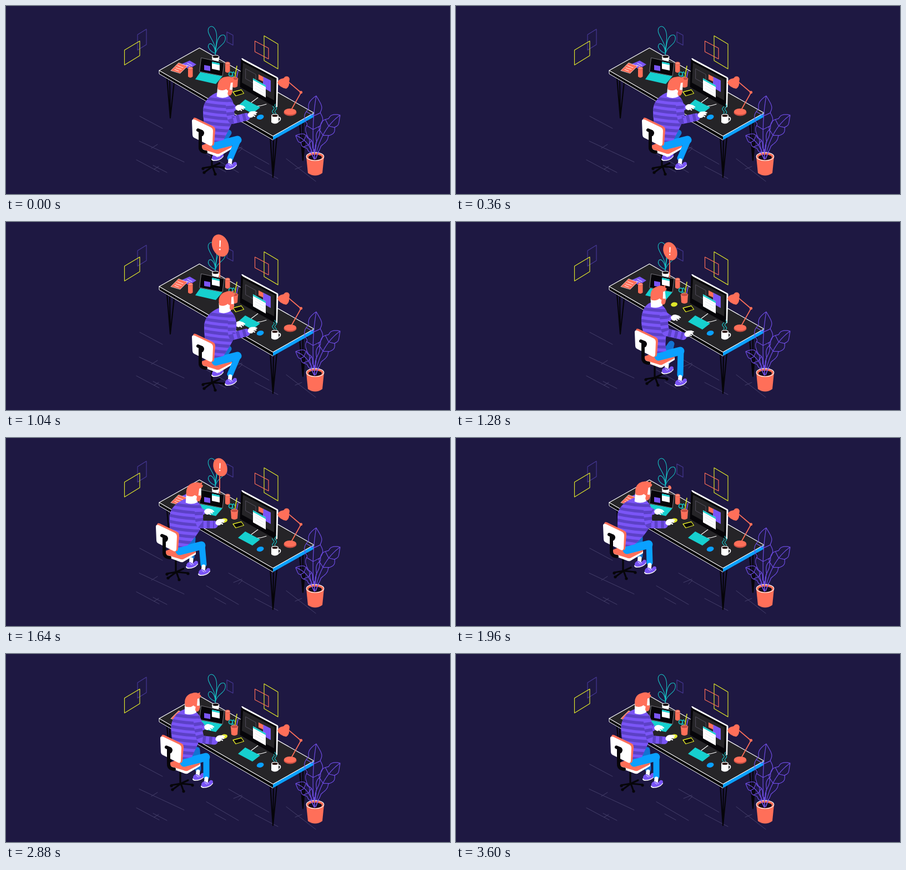
Write an HTML page that moves like this. It is 800 px wide and 341 px high and loops after 3.64 s.

```html
<!DOCTYPE html>
<html lang="en">
<head>
<meta charset="utf-8">
<title>Two screens, one desk</title>
<style>
  html, body { margin: 0; width: 100%; height: 100%; overflow: hidden; background: #1e1842; }
  svg { display: block; width: 100vw; height: 100vh; }
  path, line { fill: none; stroke-linecap: round; stroke-linejoin: round; }
  .coral { fill: #ff6f59; } .white { fill: #fff; } .teal { fill: #16d0cf; }
  .yellow { fill: #dfe62a; } .blue { fill: #0aa0ff; } .purple { fill: #7a55f6; }
  .black { fill: #060509; } .desk { fill: #252427; }
  .lcoral { stroke: #ff6f59; } .lwhite { stroke: #fff; } .lteal { stroke: #16c3c6; }
  .lyellow { stroke: #dfe62a; } .lblue { stroke: #0aa0ff; } .lpurple { stroke: #7a55f6; }
  .lblack { stroke: #060509; } .lnavy { stroke: #1273d2; } .ldim { stroke: #463895; }
  .stripe { stroke: #5c41c6; stroke-width: 5.5; stroke-linecap: butt; }
</style>
</head>
<body>
<svg viewBox="0 0 800 341" preserveAspectRatio="none">
  <rect width="800" height="341" fill="#1e1842"/>

  <!-- floor -->
  <path stroke="#49436f" stroke-width=".9" d="M241 200L282 222M240 245L321 283M262 258L273 251M235 279L276 301M265 289L290 302M267 296L275 291
    M361 268L419 302M376 290L396 301M401 245L474 287M410 262L425 256M419 265L426 258M448 291L490 313M505 277L558 318M521 296L533 291"/>

  <!-- wall -->
  <g stroke-width="1.150">
    <path class="ldim" d="M237 52L253 42V70L237 80ZM398 47L409 53V71L398 65Z"/>
    <path class="lyellow" d="M213.500 80L241 63.500V90L213.500 107ZM465 54L490 69V114L465 99Z"/>
    <path class="lcoral" d="M448.500 63.500L473 76.500V96L448.500 83Z"/>
  </g>

  <!-- desk -->
  <path class="lblack" stroke-width="2.2" d="M290 130L296 203L303 138M295 132L296 203M476 236L481 311L488 238M482 240L481 311M529 212L535 280L542 205M535 210L535 280"/>
  <path class="black" d="M276 117L481 236V243L276 123Z"/>
  <path class="blue" d="M481 236L555 194V201L481 243Z"/>
  <path class="desk lwhite" stroke-width="1.150" d="M276 117L348.500 76L555 194L481 236Z"/>
  <path class="lwhite" stroke-width="1" d="M276 117V123L481 243"/>

  <!-- small plant -->
  <path class="lteal" stroke-width="1.050" d="M377 90C380 68 368 60 364.500 47C363 37 371 34 376 41C383 52 378 68 377 90
    C379 70 380 58 388 53C396 50 397 59 393 66C387 74 379 76 377 88C378 76 371 66 366 69C361 75 369 83 377 86"/>
  <path class="white" d="M371 92L372 101Q377.500 105 383 101L384.500 92Z"/>
  <ellipse cx="377.700" cy="92" rx="6" ry="2.800" fill="#1a1114" stroke="#fff"/>

  <g id="sign">
    <path class="lcoral" stroke-width="1.8" d="M385 66V102"/>
    <ellipse class="coral" cx="386" cy="53" rx="12" ry="17" transform="rotate(-20 386 53)"/>
    <text x="385.500" y="60" text-anchor="middle" fill="#fff" font-family="Inter, Arial, sans-serif" font-size="20" transform="rotate(2 386 53)">!</text>
  </g>

  <!-- left half of the desk -->
  <path class="purple" d="M317 105L331 99L343 106L329 115Z"/>
  <path class="coral" stroke="#fff" stroke-width=".6" d="M297 117L311 103L327 109L314 122Z"/>
  <path class="lwhite" stroke-width=".9" d="M309 108L319 112M306 112L316 115M304 115L311 118M327 104L335 108M325 107L332 110"/>
  <g id="can"><path class="coral" d="M328 113V128Q332 132 336.500 128V113Z"/><ellipse cx="332.200" cy="113" rx="4.300" ry="2.500" fill="#ff8a75" stroke="#c94e42" stroke-width=".7"/></g>
  <use href="#can" x="67" y="-9"/>
  <path class="black" stroke="#77757d" stroke-width="1" d="M352 94L393 103L390 127L349 119Z"/>
  <path class="purple" d="M357 107L368 109V118L357 116Z"/>
  <path class="white" d="M371 101L385 104V117L371 114Z"/>
  <path class="teal" d="M371 101L385 104V107L371 104Z"/>
  <path class="teal" d="M350 120L390 127.500L378 141.500L341 133Z"/>

  <!-- cup, mouse, phone -->
  <path class="lteal" stroke-width="1.5" d="M410 132L406 127C399 128 401 118 406 120C410 121 408 126 406 127M411 130C405 122 411 115 412 123"/>
  <path class="lyellow" stroke-width="1.600" d="M412 132L416 109"/>
  <path class="lpurple" stroke-width="1.600" d="M415 132L418 118"/>
  <path class="coral" d="M405 132L406 146Q411.500 150 417 146L418 132Z"/>
  <ellipse cx="411.500" cy="132" rx="6.500" ry="3" fill="#c94e42" stroke="#ff8a75" stroke-width=".8"/>
  <ellipse class="yellow" cx="393" cy="149.500" rx="6" ry="4" transform="rotate(-10 393 149)"/>
  <path class="black lyellow" stroke-width="1.300" d="M409 156L424 152L428.500 158.500L414 163Z"/>

  <!-- monitor -->
  <path class="lwhite" stroke-width="1.150" d="M454 166L442 175Q439 179 446 181Q455 183 469 178"/>
  <path class="white" d="M424 95Q426 94 428 96L489 129Q491 130 490.500 133L489 183L486 184Z"/>
  <path class="black" d="M423.500 97L487.500 131L486.500 184L421.500 147Z"/>
  <path class="desk" d="M427 103L484 133L483 171L425 139Z"/>
  <path stroke="#655f72" stroke-width=".7" d="M432 114L450 124V142L432 132Z"/>
  <path class="purple" d="M463 128L477 135V156L463 148Z"/>
  <path class="coral" d="M455 124L463.500 128.500V137L455 133Z"/>
  <path class="white" d="M445 131L468 144V166L445 153Z"/>
  <path class="teal" d="M445 131L468 144V147L445 134Z"/>
  <path stroke="#d5dbe2" stroke-width=".6" d="M449 139L464 148M449 144L464 153M449 149L464 158"/>

  <!-- keyboard, mouse, mug -->
  <path class="teal" d="M418 181L431 169.500L458 184L444 195Z"/>
  <ellipse class="blue" cx="458" cy="201.500" rx="6.500" ry="4.300" transform="rotate(-15 458 201)"/>
  <path class="lwhite" stroke-width="1.700" d="M490 202C496 200 496 209 490 209"/>
  <path class="white" d="M478 199V211Q484.500 216 491 211V199Z"/>
  <ellipse cx="484.500" cy="199" rx="5.800" ry="2.700" fill="#2a1512" stroke="#fff" stroke-width="1.300"/>
  <path id="steam" class="lteal" stroke-width="1.150"/>

  <!-- lamp -->
  <ellipse cx="512" cy="193" rx="11.500" ry="6.500" fill="#c94e42"/>
  <ellipse class="coral" cx="512" cy="191.500" rx="11" ry="5.500"/>
  <path class="lcoral" stroke-width="1.700" d="M513 190L531.500 157L508 137"/>
  <circle class="coral" cx="531.500" cy="156.500" r="2.600"/>
  <path class="coral" d="M489 139Q491 132 500 131L503 128Q509 126 511 132L510 139Q511 146 505 150Q493 148 489 139Z"/>

  <!-- worker -->
  <clipPath id="clip"><path id="clipShape"/></clipPath>
  <g id="base">
    <path class="lblack" stroke-width="3.200" d="M36 62V88M37 88L20 91M37 88L58 90M37 88L42 102M37 88L22 99M37 88L50 82"/>
    <g class="black"><circle cx="20" cy="92" r="2.600"/><circle cx="58" cy="91" r="2.600"/><circle cx="42" cy="102" r="2.600"/><circle cx="22" cy="99" r="2.600"/></g>
  </g>
  <path id="farShin" class="lnavy" stroke-width="11"/>
  <g id="farFoot"><use href="#shoe"/></g>
  <g id="seat">
    <path class="white" d="M13 53L47 64L72 51V56L49 70Q46 71 42 69L13 58Z"/>
    <path class="coral" d="M12 52L40 41L70 48Q74 51 70 54L49 65Q46 66 42 64L13 55Z"/>
  </g>
  <path id="thigh" class="lblue" stroke-width="15"/>
  <path id="shin" class="lblue" stroke-width="11"/>
  <g id="foot"><g id="shoe">
    <path class="lwhite" stroke-width="7" stroke-linecap="butt" d="M-1 -10L-1.500 -5"/>
    <path class="white" d="M-11 3Q-11 7 -6 7Q5 7 11 -1L10 -4Z"/>
    <path class="purple" d="M-10 0Q-8 -5 -4 -5L2 -3L6 -7Q11 -8 11 -3Q6 5 -5 5.500Q-11 5 -10 0Z"/>
    <path class="lwhite" stroke-width=".9" d="M-4 -3L0 0M-1 -4L3 -1"/>
  </g></g>
  <path id="farArm" class="lpurple" stroke-width="11"/>
  <path id="farBands" class="stripe" style="stroke-width:11" stroke-dasharray="5 6"/>
  <g id="farHand"><use href="#palm"/></g>
  <path id="torso" class="purple"/>
  <g clip-path="url(#clip)"><g id="bands"></g></g>
  <g id="head">
    <path class="white" d="M-9 -13L12 -14L12 2Q2 8 -9 4Z"/>
    <path class="white" d="M11 -25L17.500 -25L18.500 -7L11 -5Z"/>
    <path class="coral" d="M11 -12Q14 -9 18 -11Q19 -3 15 0Q11 1 10 -3Z"/>
    <path class="coral" d="M-8 -9C-11 -20 -7 -31 4 -33Q11 -35.500 15 -33L19 -35L18 -31L20.500 -29Q20 -24 14 -23L13 -10Q10 -7 7 -11Q1 -6 -8 -9Z"/>
  </g>
  <path id="arm" class="lpurple" stroke-width="14"/>
  <path id="armBands" class="stripe" style="stroke-width:14" stroke-dasharray="5.500 6"/>
  <g id="hand"><g id="palm">
    <path class="white" d="M-8 1Q-6 -5 0 -5L6 -4Q10 -2 8 0L3 2L0 6Q-6 7 -8 1Z"/>
    <path class="lwhite" stroke-width="2.300" d="M2 -3L9 -1M1 0L7 2M0 2L4 5"/>
  </g></g>
  <g id="back">
    <path class="coral" d="M2 4Q2 -2 7 0L38 15Q42 17 42 22L40 47Q39 52 34 50L6 36Z"/>
    <path class="white" d="M0 6Q0 1 5 3L34 17Q38 19 38 24L37 47Q36 52 32 50L4 36Q1 34 1 31Z"/>
    <path class="lblack" stroke-width="6" d="M11 22L18 25Q20 27 18 30M15 25V53Q15 61 25 62"/>
  </g>

  <!-- big plant -->
  <g id="plant" stroke="#6c4be0" stroke-width="1.200"></g>
  <path class="coral" d="M541 273L544 303Q557 312 570 303L573 273Z"/>
  <ellipse class="coral" cx="557" cy="273" rx="15.800" ry="7.500" stroke="#fff" stroke-width="1.100"/>
  <ellipse cx="557" cy="274.500" rx="12" ry="5" fill="#130d1c"/>
  <path class="lpurple" stroke-width="1.600" d="M549 264L555 277M556 260V278M563 264L558 277"/>
</svg>
<script>
const LOOP = 3640, STEP = 40;
const $ = id => document.getElementById(id);
const setD = (d, ...ids) => ids.forEach(id => $(id).setAttribute('d', d));
const place = (id, [x, y], r = 0) => $(id).setAttribute('transform', `translate(${x} ${y}) rotate(${r})`);
const at = ([x, y], dx, dy) => [x + dx, y + dy];
const line = (...pts) => 'M' + pts.join('L');

// chair, neck, head tilt, elbow, hand, far hand, foot, far foot
const poses = {
  type:  [335, 203, 389, 161, 5, 408, 207, 443, 196, 421, 184, 405, 290, 381, 274],
  look:  [335, 203, 393, 160, -2, 409, 207, 443, 196, 421, 184, 405, 290, 381, 274],
  push:  [322, 194, 360, 150, -2, 379, 200, 419, 202, 395, 173, 405, 291, 381, 269],
  slide: [270, 155, 333, 114, 3, 351, 157, 385, 152, 365, 133, 357, 243, 335, 230],
  lean:  [265, 153, 331, 112, 4, 349, 157, 385, 152, 365, 133, 350, 240, 332, 228],
  work:  [278, 147, 331, 104, 0, 352, 155, 385, 152, 365, 133, 362, 236, 347, 223]
};
const ease = {
  io: u => u * u * (3 - 2 * u),
  in: u => u * u,
  out: u => 1 - (1 - u) ** 2
};
const moves = [
  [0, 'type'], [560, 'type'], [720, 'look'], [1140, 'look'], [1280, 'push', 'in'],
  [1640, 'slide', 'out'], [1800, 'lean'], [2400, 'lean'], [2720, 'work'], [LOOP, 'work']
];
const signKeys = [[0, 0], [900, 0], [1060, 1.24, 'out'], [1180, .95], [1260, 1], [1720, 1], [1800, 1.05], [1980, 0, 'in'], [LOOP, 0]];

function sample(keys, t, mix) {
  const i = Math.max(1, keys.findIndex(k => k[0] > t));
  const [t0, a] = keys[i - 1], [t1, b, e = 'io'] = keys[i];
  return mix(a, b, ease[e]((t - t0) / (t1 - t0)));
}
const lerp = (a, b, u) => a + (b - a) * u;
const mixPose = (a, b, u) => poses[a].map((v, i) => lerp(v, poses[b][i], u));

// banana leaf: rounded lobes along a curved spine
function leaf(base, ctrl, tip, width, lobes) {
  const point = u => [0, 1].map(k => (1 - u) ** 2 * base[k] + 2 * u * (1 - u) * ctrl[k] + u * u * tip[k]);
  const edge = (u, side) => {
    const [x, y] = point(u), [x2, y2] = point(u + .01);
    const len = Math.hypot(x2 - x, y2 - y);
    const lobe = .72 + .32 * Math.abs(Math.sin(lobes * Math.PI * u + side * .3));
    const w = side * width * Math.max(0, Math.sin(Math.PI * u ** 1.5)) ** .75 * lobe;
    return [x - (y2 - y) / len * w, y + (x2 - x) / len * w].map(v => v.toFixed(1));
  };
  const us = Array.from({ length: 49 }, (_, i) => i / 48);
  let d = line(...us.map(u => edge(u, 1))) + line(...us.map(u => edge(u, -1))) + line(...us.map(point));
  for (const u of [.5, .72])
    for (const side of [1, -1]) d += line(point(u - .06), edge(u, side));
  return `<path d="${d}"/>`;
}

$('plant').innerHTML =
  leaf([555, 276], [550, 215], [559, 163], 16, 4) +
  leaf([557, 276], [568, 222], [602, 198], 14, 4) +
  leaf([554, 276], [548, 244], [522, 235], 10, 3);
$('bands').innerHTML = Array.from({ length: 9 }, (_, i) =>
  `<path class="stripe" d="M-50 ${i * 11 + 1}Q-14 ${i * 11 + 12} 38 ${i * 11 + 11}"/>`).join('');

function steam(t) {
  const strand = (x, top) => line(...Array.from({ length: 13 }, (_, i) => {
    const y = 195 - i / 12 * (195 - top);
    return [(x + 1.7 * Math.sin(y * .55 + t / LOOP * 8 * Math.PI)).toFixed(1), y.toFixed(1)];
  }));
  return strand(481.5, 182) + strand(486, 178);
}

function draw(t) {
  const p = sample(moves, t, mixPose);
  const pair = i => [p[i], p[i + 1]];
  const chair = pair(0), neck = pair(2), elbow = pair(5), foot = pair(11), farFoot = pair(13);
  const typing = t < 1120 || t > 1800;
  const tap = typing ? Math.sin(t / 280 * 2 * Math.PI) : 0;
  const hand = at(pair(7), 0, tap * .5), farHand = at(pair(9), 0, -tap * .9);
  const knee = at(chair, 82, 40), farKnee = at(chair, 66, 27);

  ['base', 'seat', 'back'].forEach(id => place(id, chair));
  place('foot', foot);
  place('farFoot', farFoot);
  setD(line(at(chair, 54, 44), farKnee, at(farFoot, -1, -14)), 'farShin');
  setD(line(at(chair, 43, 50), knee), 'thigh');
  setD(line(at(knee, 1, 0), at(foot, -1, -14)), 'shin');

  const left = (chair[0] + neck[0]) / 2 - 7;
  const n = (x, y) => at(neck, x, y), c = (x, y) => at(chair, x, y);
  const side = dy => [left, neck[1] + dy];
  setD(`M${n(-9, -4)}C${n(-18, -1)} ${side(10)} ${side(30)}C${side(50)} ${c(26, 30)} ${c(32, 46)}L${c(57, 40)}` +
    `C${n(14, 60)} ${n(24, 45)} ${n(22, 22)}C${n(20, 8)} ${n(14, 2)} ${n(9, 0)}Z`, 'torso', 'clipShape');
  place('bands', neck);
  place('head', at(neck, 0, tap * .25), p[4]);

  setD(`M${n(14, 20)}Q${at(elbow, -3, 0)} ${elbow}L${at(hand, -10, 5)}`, 'arm', 'armBands');
  setD(line(n(12, 15), at(farHand, -11, 1)), 'farArm', 'farBands');
  place('hand', hand, -12);
  place('farHand', farHand, 8);

  const s = sample(signKeys, t, lerp);
  $('sign').setAttribute('transform', `translate(385 100) scale(${s}) translate(-385 -100)`);
  $('sign').style.visibility = s > .01 ? 'visible' : 'hidden';
  setD(steam(t), 'steam');
}

const start = performance.now();
function tick() {
  const t = (performance.now() - start) % LOOP;
  draw(Math.floor(t / STEP) * STEP);
  requestAnimationFrame(tick);
}
tick();
</script>
</body>
</html>
```
